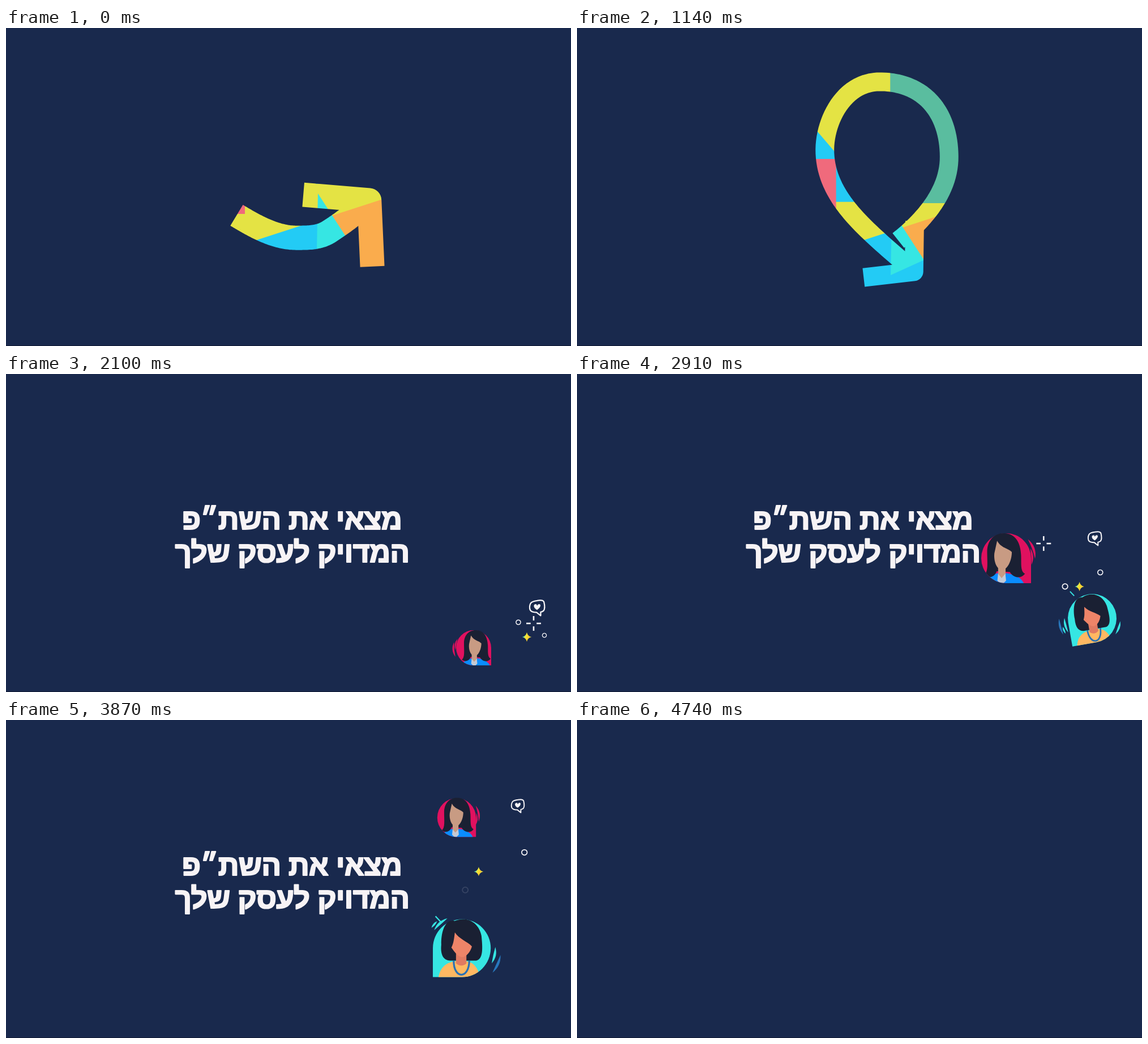
Recreate the animation shown at these times as an HTML page with a canvas. Size 998 by 561 pixels, loop 5190 ms.

```html
<!DOCTYPE html>
<html lang="he">
<head>
<meta charset="utf-8">
<title>מצאי את השת״פ</title>
<style>
  html, body { margin: 0; width: 100%; height: 100%; overflow: hidden; background: #19294d; }
  canvas, svg { position: absolute; left: 0; top: 0; width: 998px; height: 561px; }
  text {
    font: 700 51px "Liberation Sans", Arial, sans-serif;
    letter-spacing: -.5px; direction: rtl; text-anchor: middle;
    fill: #f7f3f5; stroke: #f7f3f5; stroke-width: 2.2px; stroke-linejoin: round;
  }
</style>
</head>
<body>
<canvas id="stage" width="998" height="561"></canvas>
<svg viewBox="0 0 998 561">
  <g id="title">
    <text x="505" y="274">מצאי את השת״פ</text>
    <text x="505.5" y="332">המדויק לעסק שלך</text>
  </g>
</svg>
<script>
const W = 998, H = 561, LOOP = 5190, STEP = 30, END = 4740;
const ctx = document.getElementById('stage').getContext('2d');
const title = document.getElementById('title');
const layer = document.createElement('canvas');
layer.width = W;
layer.height = H;
const ink = layer.getContext('2d');

const C = {
  night: '#19294d', edge: '#111b33', yellow: '#e4e344', blue: '#23cbf5', cyan: '#36e6e3',
  orange: '#faac4d', red: '#f06a7c', green: '#5abd9f', pink: '#e0115f', hair: '#1a2033', white: '#f7f5f8'
};

const clamp = v => Math.max(0, Math.min(1, v));
const ramp = (t, a, b) => { const k = clamp((t - a) / (b - a)); return k * k * (3 - 2 * k); };
const mix = (a, b, k) => a + (b - a) * k;
const fadeOut = t => 1 - ramp(t, 4440, 4710);

// Cubic through four poses held at these times
const POSES = [2100, 2910, 3450, 4260];
const through = (t, ...values) => values.reduce((sum, v, i) =>
  sum + POSES.reduce((w, p, j) => j === i ? w : w * (t - p) / (POSES[i] - p), v), 0);

// Draws a figure on its own layer so that it fades as a whole.
function place(x, y, scale, deg, alpha, draw) {
  if (alpha <= 0 || scale <= 0) return;
  ink.clearRect(0, 0, W, H);
  ink.save();
  ink.translate(x, y);
  ink.rotate(deg * Math.PI / 180);
  ink.scale(scale, scale);
  draw();
  ink.restore();
  ctx.globalAlpha = alpha;
  ctx.drawImage(layer, 0, 0);
  ctx.globalAlpha = 1;
}

function fillAll(parts) {
  for (const [color, path] of parts) {
    ink.fillStyle = color;
    ink.fill(path);
  }
}

const paths = parts => parts.map(([color, d]) => [color, new Path2D(d)]);

// Arrow: a ribbon trimmed along one route, coloured by patches fixed in the scene
const route = document.createElementNS('http://www.w3.org/2000/svg', 'path');
route.setAttribute('d', 'M426 328C458 352 487 371 518 371C537 371 552 371 567 360'
  + 'C636 305 683 240 683 169C683 60 620-5 523-5C440-5 396 85 396 152C396 270 505 345 602 433L672 497');
const LENGTH = route.getTotalLength(), HEAD = 242, TAIL = 153, RUN = LENGTH - 95;

const PATCHES = paths([
  [C.yellow, 'M-999-999H1999V1999H-999Z'],
  [C.blue, 'M200-99L320 41 518 272H100V-99Z'],
  [C.red, 'M0 173H422V328H0Z'],
  [C.green, 'M547-500H1400V275H547Z'],
  [C.blue, 'M0 517.6L548 340 625 406V1200H0Z'],
  [C.orange, 'M548 340L1400 64V1200H625V406Z'],
  [C.blue, 'M548 441L625 406V1200H548Z'],
  [C.cyan, 'M551 292L625 406 548 441Z']
]);

function arrow(t) {
  const squash = mix(.15, 1, ramp(t, 0, 330)) * (1 - ramp(t, 330, 1080));
  const size = 1 - ramp(t, 1230, 1470);
  const head = Math.min(LENGTH, mix(HEAD, RUN, t / 1140));
  const tail = t < 1140 ? TAIL * t / 1140 : mix(TAIL, LENGTH - 10, ramp(t, 1140, 1470));
  const at = len => {
    const p = route.getPointAtLength(len);
    return [550 + (p.x - 550) * (1 + squash), 360 + (p.y - 360) * (1 - squash / 2)];
  };
  const tip = at(head), back = at(head - 4);
  const dir = Math.atan2(tip[1] - back[1], tip[0] - back[0]);
  const barb = side => {
    const a = dir + Math.PI - side * .85, len = 117 * size;
    return [tip[0] + len * Math.cos(a), tip[1] + len * Math.sin(a)];
  };
  const ribbon = points => {
    ink.beginPath();
    points.forEach(p => ink.lineTo(...p));
    ink.stroke();
  };
  ink.lineWidth = 43 * size;
  ink.lineJoin = 'round';
  ribbon(Array.from({ length: 121 }, (_, i) => at(mix(tail, head, i / 120))));
  ribbon([barb(1), tip, barb(-1)]);
  ink.globalCompositeOperation = 'source-atop';
  fillAll(PATCHES);
}

function drawArrow(t) {
  const cam = 1 - .235 * ramp(t, 0, 1080);
  place(573.6 * (1 - cam), 420 * (1 - cam), cam, 0, t < 1470 ? 1 : 0, () => arrow(t));
}

// Portraits, in units of the badge radius
const LONG_HAIR = paths([
  ['#0a8dff', 'M-.8 1.4V1C-.75.7-.5.55-.25.5H.12C.4.55.75.65.85 1V1.4Z'],
  [C.hair, 'M.05-1.1C-.4-1.12-.64-.8-.66-.4C-.66.1-.6.42-.78.58C-.6.72-.35.66-.28.42L.25.45C.4.7.7.74.86.52C.66.42.72.1.7-.25C.67-.77.45-1.08.05-1.1Z'],
  ['#c89b83', 'M-.22.2H.08V.6L-.08.75-.22.6Z'],
  ['#c3cad6', 'M-.22.52L-.08.7.07.52.1.8-.08.98-.25.8Z'],
  ['#c89b83', 'M-.26-.8C-.1-.5.2-.5.33-.35C.33 0 .15.37-.07.38C-.3.32-.4 0-.37-.3Z']
]);
const BOB_HAIR = paths([
  [C.hair, 'M-.25-.92C-.6-1-.72-.5-.71-.1C-.75.3-.6.45-.4.45H.5C.75.4.72 0 .68-.4C.6-.85.2-1.1-.25-.92Z'],
  ['#ffb862', 'M-.8 1.4V1C-.72.6-.45.5-.2.47H.15C.45.52.6.7.72 1.4Z'],
  ['#e07a62', 'M-.2.2H.16V.55Q0 .7-.2.55Z'],
  ['#ee8468', 'M-.24-.52C-.1-.3.2-.2.35-.04C.3.15.15.33 0 .33C-.15.3-.25.15-.36 0C-.28-.15-.27-.3-.24-.52Z']
]);
const NECKLACE = new Path2D('M-.28.45C-.28 1.1.25 1.1.26.45');

// Round badge with one square corner; only hair may rise above it.
function badge(side, color, sx, sy, portrait) {
  const shape = new Path2D();
  shape.arc(0, 0, 1, 0, 7);
  shape.rect(Math.min(0, side), 0, 1, 1);
  fillAll([[color, shape]]);
  shape.rect(-1.2, -1.4, 2.4, 1.4);
  ink.clip(shape);
  ink.translate(sx, sy);
  portrait();
}

function crescent(color, deg, dist, half, width) {
  const x = dist * Math.cos(half), y = dist * Math.sin(half);
  ink.save();
  ink.rotate(deg * Math.PI / 180);
  ink.fillStyle = color;
  ink.beginPath();
  ink.moveTo(x, -y);
  ink.quadraticCurveTo(2 * dist + width - x, 0, x, y);
  ink.quadraticCurveTo(2 * dist - width - x, 0, x, -y);
  ink.fill();
  ink.restore();
}

const hop = t => .13 * clamp(1 - Math.abs(t - 3450) / 500);

function drawPink(t) {
  const x = through(t, 826, 758, 773, 813), y = through(t, 483, 325, 226, 152);
  const r = through(t, 31, 44, 39, 33), orbit = through(t, 175, 340, 572, 737);
  place(x, y, r, 0, ramp(t, 1650, 1800) * fadeOut(t), () => {
    crescent(C.pink, orbit, 1.16, .37, .1);
    crescent(C.pink, orbit + 16, 1.05, .32, .08);
    const sway = .11 * Math.cos(Math.PI * (t - 2100) / 720);
    badge(1, C.pink, sway, .1 - hop(t), () => fillAll(LONG_HAIR));
  });
}

function drawTeal(t) {
  const x = through(t, 930, 910, 870, 707), y = through(t, 640, 431, 401, 402);
  const r = through(t, 34, 43, 47.5, 55);
  place(x, y, r, 0, t < 2100 ? 0 : 1 - clamp((t - 4140) / 340), () => {
    const left = through(t, 130, 165, 213, 205);
    crescent(C.cyan, left, 1.14, .27, .09);
    crescent(C.cyan, left - 8, 1.26, .12, .07);
    crescent(C.cyan, through(t, 40, 20, 0, 65), 1.16, .25, .09);
    crescent('#2878bd', through(t, 250, 165, 40, 145), 1.36, .25, .09);
    ink.strokeStyle = C.cyan;
    ink.lineWidth = .045;
    ink.beginPath();
    ink.moveTo(-.91, -1.1);
    ink.lineTo(-.74, -.92);
    ink.stroke();
    ink.rotate(through(t, -22, -10, -3, 0) * Math.PI / 180);
    badge(-1, C.cyan, 0, -hop(t), () => {
      fillAll(BOB_HAIR);
      ink.strokeStyle = '#2a72b5';
      ink.lineWidth = .065;
      ink.stroke(NECKLACE);
    });
  });
}

const BUBBLE = new Path2D('M-.8-.5Q-.7-.75 0-.85Q.7-1 .85-.7Q1.05.1.8.4Q.6.55.45.55L.45 1L-.05.6Q-.7.6-.85.3Q-1-.1-.8-.5Z');
const HEART = new Path2D('M0 .3C-.6-.05-.4-.5-.1-.4Q0-.35 0-.2Q.1-.45.3-.42C.55-.35.4.05 0 .3Z');
const STAR = new Path2D('M0-1Q.18-.18 1 0Q.18.18 0 1Q-.18.18-1 0Q-.18-.18 0-1Z');

function ring() {
  ink.strokeStyle = C.white;
  ink.lineWidth = .36;
  ink.beginPath();
  ink.arc(0, 0, 1, 0, 7);
  ink.stroke();
}

function bubble() {
  ink.strokeStyle = C.white;
  ink.lineWidth = .16;
  ink.lineJoin = 'round';
  ink.stroke(BUBBLE);
  fillAll([[C.white, HEART]]);
}

function sparkle() {
  const g = ink.createLinearGradient(-.8, -.3, .8, .3);
  [C.cyan, '#f4e736', '#fdd02f', '#e8e04a'].forEach((c, i) => g.addColorStop(i / 3, c));
  fillAll([[g, STAR]]);
}

function burst() {
  ink.strokeStyle = C.white;
  ink.lineWidth = .2;
  for (let i = 0; i < 4; i++) {
    ink.beginPath();
    ink.moveTo(.4, 0);
    ink.lineTo(1, 0);
    ink.stroke();
    ink.rotate(Math.PI / 2);
  }
}

// Steady drift (per second), then an accelerating turn aside
function drift(t, draw, size, [x, y], [vx, vy], [tx, ty], alpha = fadeOut(t)) {
  const s = (t - POSES[0]) / 1000, turn = clamp((t - POSES[2]) / 810) ** 2;
  place(x + vx * s + tx * turn, y + vy * s + ty * turn, size, 0, ramp(t, 1500, 1680) * alpha, draw);
}

function drawDecor(t) {
  const grow = ramp(t, 1800, 3450);
  drift(t, bubble, mix(14.5, 12.2, grow), [938, 412], [-29, -151], [64, 24]);
  drift(t, ring, mix(4, 5, grow), [905, 438], [-53, -78], [0, 0], 1 - ramp(t, 3600, 3950));
  drift(t, ring, mix(3.5, 4.8, grow), [951, 461], [-33, -137], [86, 56]);
  drift(t, sparkle, 8.2, [920, 464], [-40, -110], [-53, -7]);
  drift(t, burst, 13, [932, 440], [-133, -174], [0, 0], 1 - ramp(t, 3040, 3240));
}

function drawTitle(t) {
  const scale = mix(.92, 1, ramp(t, 1260, 1560));
  title.style.opacity = ramp(t, 1260, 1470) * fadeOut(t);
  title.setAttribute('transform', `translate(505 286) scale(${scale}) translate(-505 -286)`);
}

function render(t) {
  ctx.fillStyle = C.night;
  ctx.fillRect(0, 0, W, H);
  drawArrow(t);
  drawDecor(t);
  drawTeal(t);
  drawPink(t);
  drawTitle(t);
  ctx.fillStyle = C.edge;
  ctx.fillRect(0, H - 1, W, 1);
}

const start = performance.now();
function tick() {
  const t = (performance.now() - start) % LOOP;
  render(Math.min(END, Math.floor(t / STEP) * STEP));
  requestAnimationFrame(tick);
}
tick();
</script>
</body>
</html>
```
